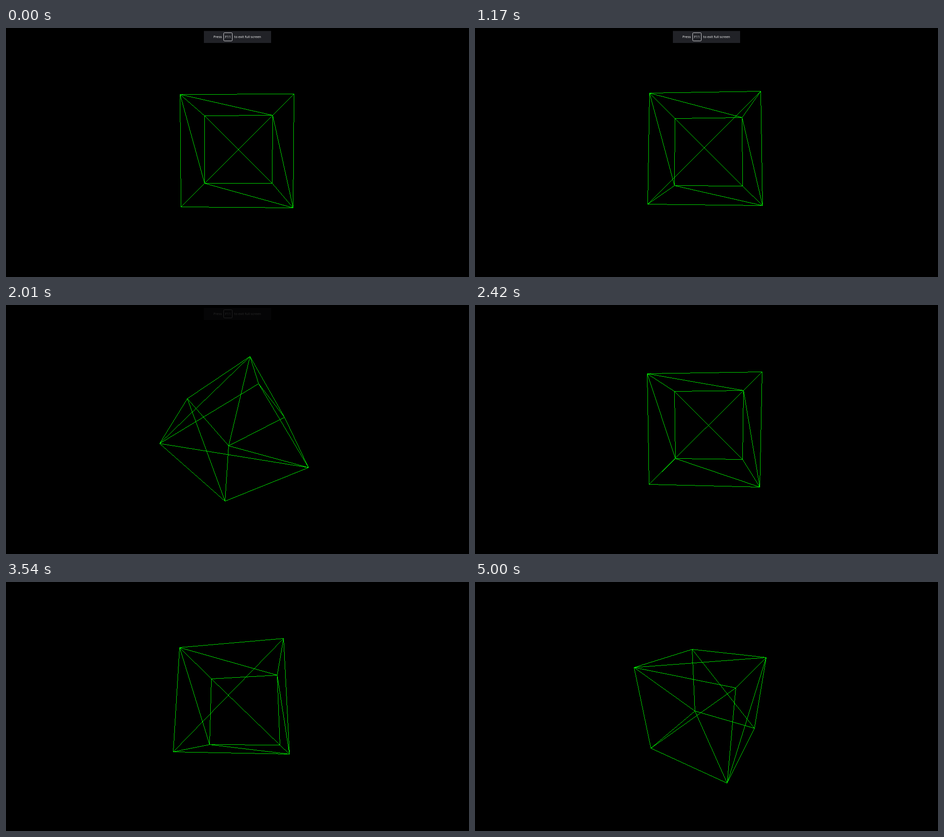
An HTML page with a canvas that plays this animation: 1020x549 px, repeating every 5.04 s.

```html
<!DOCTYPE html>
<html lang="en">
<head>
<meta charset="utf-8">
<title>Wireframe cube</title>
<style>
  html, body { margin: 0; width: 100%; height: 100%; overflow: hidden; background: #000; }
  canvas, svg { position: absolute; left: 0; top: 0; width: 100%; height: 100%; }
  text { font: 7.45px "Open Sans", "Noto Sans", sans-serif; fill: #fff; }
</style>
</head>
<body>
<canvas id="stage" width="1020" height="549"></canvas>
<svg id="hint" viewBox="0 0 1020 549">
  <rect x="436" y="6.5" width="148" height="26.5" fill="#212227"/>
  <rect x="479.5" y="10.5" width="19" height="18" rx="2" fill="none" stroke="#d8d8dc"/>
  <text x="457" y="22.4">Press</text>
  <text x="489" y="22.4" text-anchor="middle">F11</text>
  <text x="502.8" y="22.4">to exit full screen</text>
</svg>
<script>
const LOOP = 5040;
const CENTER = [510, 268.9], SCALE = 374, DISTANCE = 4;
const START_ANGLE = -91, STEP_ANGLE = -4.644;
const FADE_START = 1605, FADE_TIME = 670;

// [step, time in ms]: steps are evenly spaced between these marks.
const PACE = [[0, 0], [18, 550], [35, 1080], [52, 1610], [69, 2140], [86, 2660],
  [103, 3200], [120, 3730], [138, 4280], [155, 4810], [161, 5000], [162, LOOP]];

const stage = document.getElementById("stage");
const ctx = stage.getContext("2d");
const hint = document.getElementById("hint");

const corners = Array.from({ length: 8 }, (_, i) => [1, 2, 4].map(bit => i & bit ? -1 : 1));

// Twelve cube edges plus one diagonal on each face.
function joined(a, b) {
  const differing = a.filter((v, i) => v !== b[i]).length;
  const even = a[0] * a[1] * a[2] > 0;
  return differing === 1 || (differing === 2 && even === (a[0] !== b[0]));
}

const edges = [];
corners.forEach((a, i) => corners.forEach((b, j) => {
  if (i < j && joined(a, b)) edges.push([i, j]);
}));

function stepAt(time) {
  const i = PACE.findIndex(mark => mark[1] > time) - 1;
  const [k0, t0] = PACE[i], [k1, t1] = PACE[i + 1];
  const step = k0 + Math.floor((time - t0 + 5.5) * (k1 - k0) / (t1 - t0));
  return Math.min(step, 161);
}

// Turn about z, then about x by the same angle, then project to a pixel.
function project([x, y, z], angle) {
  const c = Math.cos(angle), s = Math.sin(angle);
  const px = x * c - y * s;
  const turned = x * s + y * c;
  const py = turned * c - z * s;
  const pz = turned * s + z * c;
  const zoom = SCALE / (DISTANCE - pz);
  return [CENTER[0] + px * zoom, CENTER[1] + py * zoom].map(Math.round);
}

// One hard pixel per step along the longer axis.
function pixelLine([x0, y0], [x1, y1]) {
  const dx = x1 - x0, dy = y1 - y0;
  const count = Math.max(Math.abs(dx), Math.abs(dy), 1);
  for (let i = 0; i <= count; i++) {
    ctx.fillRect(Math.round(x0 + dx * i / count), Math.round(y0 + dy * i / count), 1, 1);
  }
}

function draw(time) {
  const angle = (START_ANGLE + STEP_ANGLE * stepAt(time)) * Math.PI / 180;
  const points = corners.map(corner => project(corner, angle));
  ctx.clearRect(0, 0, stage.width, stage.height);
  ctx.fillStyle = "#00e600";
  edges.forEach(([i, j]) => pixelLine(points[i], points[j]));

  const fade = Math.min(1, Math.max(0, (time - FADE_START) / FADE_TIME));
  hint.style.opacity = (1 - fade) ** 2;
}

const start = performance.now();
function tick() {
  draw((performance.now() - start) % LOOP);
  requestAnimationFrame(tick);
}
tick();
</script>
</body>
</html>
```
